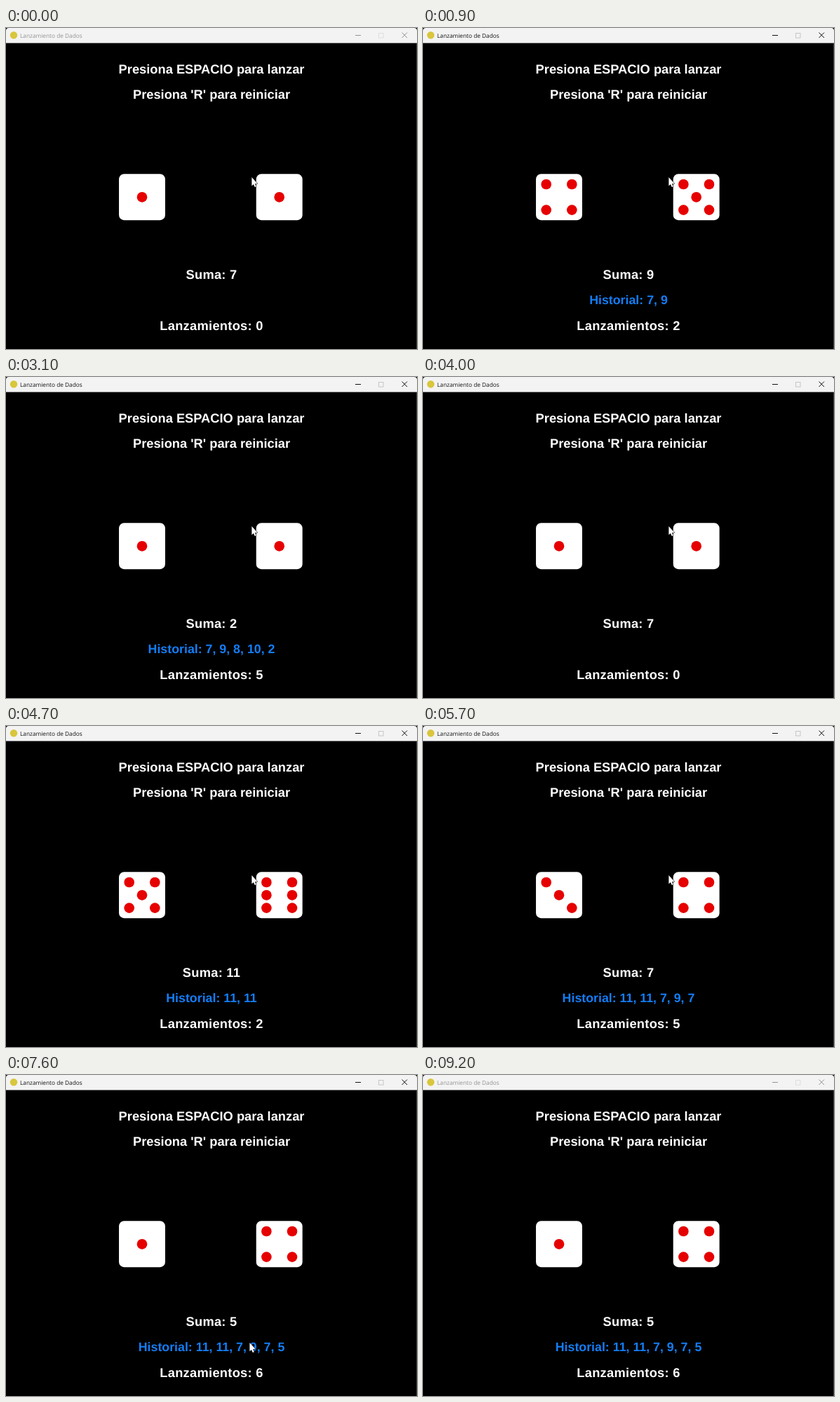
Recreate the animation shown at these times as an HTML page with a canvas. Size 586x458 px, loop 9.4 s.

```html
<!DOCTYPE html>
<html lang="es">
<head>
<meta charset="utf-8">
<title>Lanzamiento de Dados</title>
<style>
  html, body { margin: 0; width: 100%; height: 100%; overflow: hidden; background: #000; }
  canvas { display: block; }
</style>
</head>
<body>
<canvas id="stage" width="586" height="458"></canvas>
<script>
const W = 586, H = 458, LOOP = 9400, STEP = 100;
const SCALE = W / 800; // the window is laid out on an 800 px wide grid
const ctx = document.getElementById('stage').getContext('2d');

// Throws come in evenly paced bursts; each word is one pair of faces.
const bursts = [
  { start: 300, gap: 500, throws: '34 45 62 64 11' },
  { start: 4300, gap: 330, throws: '65 56 16 36 34' },
  { start: 7200, gap: 0, throws: '14' }
];
const RESET = 4000;

// The pointer eases from one stop to the next.
const stops = [
  { from: 0, to: 0, x: 350, y: 213 },
  { from: 5700, to: 6200, x: 228, y: 196 },
  { from: 6200, to: 6600, x: 325, y: 385 },
  { from: 6600, to: 7600, x: 347, y: 382 },
  { from: 7600, to: 8300, x: 71, y: 60 },
  { from: 8300, to: 8800, x: 174, y: -16 }
];

function stateAt(t) {
  const since = t < RESET ? 0 : RESET;
  const thrown = bursts.flatMap(({ start, gap, throws }) =>
    throws.split(' ').map((word, i) => ({ at: start + i * gap, dice: [...word].map(Number) })))
    .filter(({ at }) => at >= since && at <= t);
  const history = thrown.map(({ dice }) => dice[0] + dice[1]);
  return {
    dice: thrown.length ? thrown.at(-1).dice : [1, 1],
    sum: history.at(-1) ?? 7,
    history
  };
}

function pointerAt(t) {
  let { x, y } = stops[0];
  for (const stop of stops) {
    const k = Math.min(1, Math.max(0, (t - stop.from) / (stop.to - stop.from || 1)));
    const ease = k * k * (3 - 2 * k);
    x += (stop.x - x) * ease;
    y += (stop.y - y) * ease;
  }
  return { x, y };
}

function label(text, row, { size = 18.3, color = '#fff', spacing = 0 } = {}) {
  ctx.font = `bold ${size}px "Liberation Sans", Arial, sans-serif`;
  ctx.textRendering = 'geometricPrecision';
  ctx.letterSpacing = spacing + 'px';
  ctx.textAlign = 'center';
  ctx.fillStyle = color;
  ctx.fillText(text, W / 2, Math.round(64.6 + row * 50 * SCALE));
  ctx.letterSpacing = '0px';
}

function disc(x, y, r, color) {
  ctx.fillStyle = color;
  ctx.beginPath();
  ctx.arc(x, y, r, 0, Math.PI * 2);
  ctx.fill();
}

function die(cx, value) {
  const cy = 241.3, side = 90 * SCALE, gap = 25 * SCALE, r = 10 * SCALE;
  ctx.fillStyle = '#fff';
  ctx.beginPath();
  ctx.roundRect(cx - side / 2, cy - side / 2, side, side, r);
  ctx.fill();
  const pip = (i, j) => disc(cx + i * gap, cy + j * gap, r, '#e60000');
  const pair = (i, j) => { pip(i, j); pip(-i, -j); };
  if (value % 2) pip(0, 0);
  if (value > 1) pair(-1, -1);
  if (value > 3) pair(1, -1);
  if (value === 6) pair(1, 0);
}

function trace(...points) {
  ctx.beginPath();
  points.forEach(([x, y]) => ctx.lineTo(x, y));
}

function titleBar(active) {
  const ink = active ? '#111' : '#929292';
  ctx.fillStyle = '#f3f3f3';
  ctx.beginPath();
  ctx.roundRect(0, 0, W, 21.5, [4, 4, 0, 0]);
  ctx.fill();
  disc(11, 10.3, 5.2, '#d9c63c');

  ctx.font = '8.3px "Open Sans", "Noto Sans", sans-serif';
  ctx.textAlign = 'left';
  ctx.fillStyle = ink;
  ctx.fillText('Lanzamiento de Dados', 20, 14);

  ctx.lineWidth = 1;
  ctx.strokeStyle = ink;
  trace([498, 10.5], [506, 10.5]);
  ctx.stroke();
  trace([564.5, 6.5], [572, 14]);
  ctx.stroke();
  trace([572, 6.5], [564.5, 14]);
  ctx.stroke();
  ctx.strokeStyle = active ? '#c6c6c6' : '#dedede';
  ctx.strokeRect(531.5, 7.5, 6.5, 6.5);
}

function pointer({ x, y }) {
  ctx.save();
  ctx.translate(x, y);
  trace([0.4, 0], [0.4, 12.3], [3, 9.9], [4.8, 14], [6.8, 13.2], [5, 9.2], [8.6, 9]);
  ctx.closePath();
  ctx.lineWidth = 1;
  ctx.strokeStyle = '#000';
  ctx.stroke();
  ctx.fillStyle = '#fff';
  ctx.fill();
  ctx.restore();
}

function draw(t) {
  const { dice, sum, history } = stateAt(t);
  ctx.fillStyle = '#000';
  ctx.fillRect(0, 0, W, H);
  ctx.fillStyle = '#3a3a3a';
  ctx.fillRect(W - 1, 22, 1, H);
  titleBar(t >= 100 && t < 9000);

  label('Presiona ESPACIO para lanzar', 0);
  label("Presiona 'R' para reiniciar", 1);
  die(194, dice[0]);
  die(389.7, dice[1]);
  label('Suma: ' + sum, 8, { spacing: 0.28 });
  if (history.length) {
    label('Historial: ' + history.join(', '), 9, { size: 17.8, color: '#147df5' });
  }
  label('Lanzamientos: ' + history.length, 10, { spacing: 0.28 });
  pointer(pointerAt(t));
}

const start = performance.now();
function tick() {
  const t = (performance.now() - start) % LOOP;
  draw(Math.floor(t / STEP) * STEP);
  requestAnimationFrame(tick);
}
tick();
</script>
</body>
</html>
```
